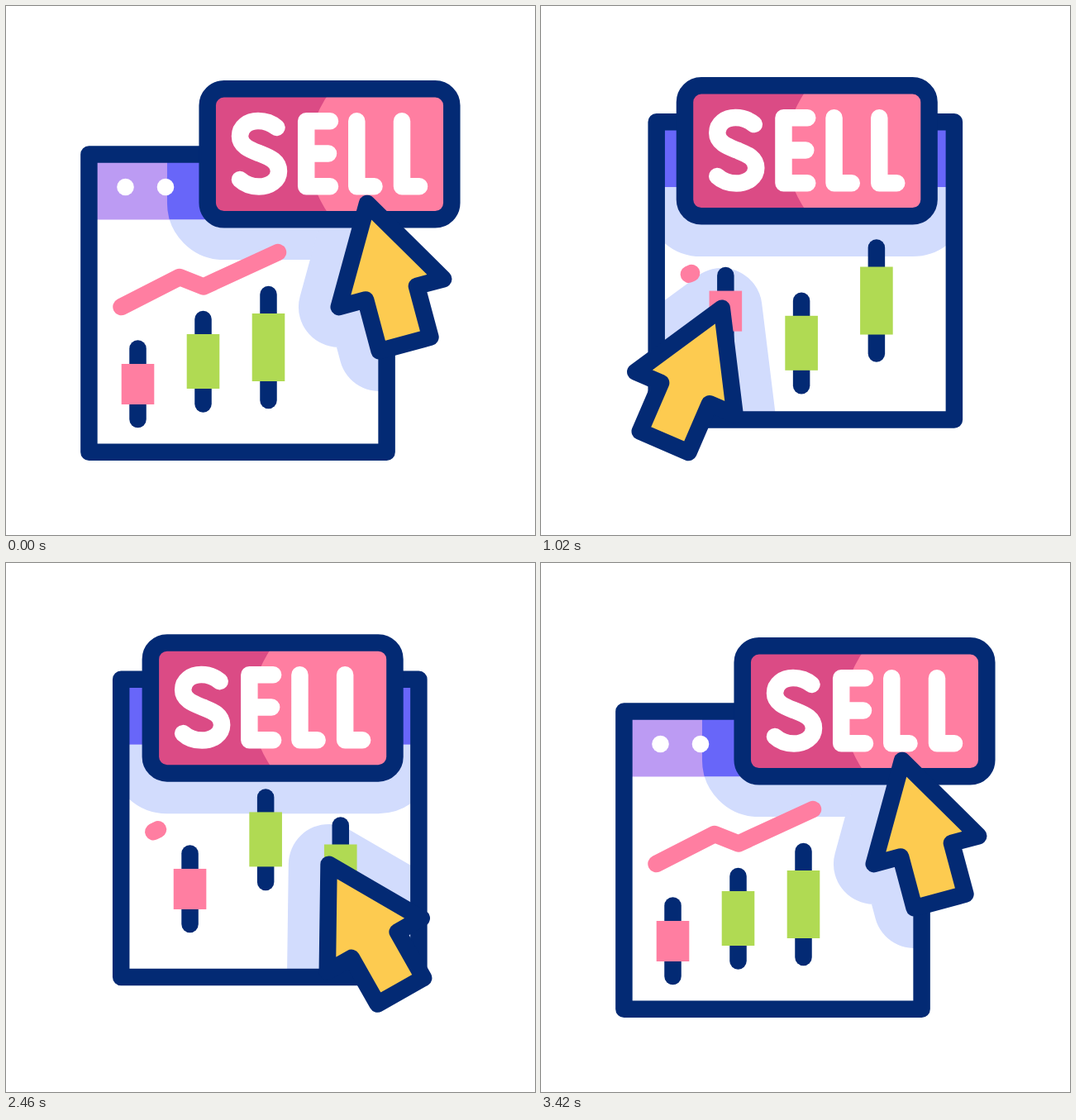
Write an HTML page that moves like this. It is 640 px wide and 640 px high and loops after 3600 ms.

```html
<!DOCTYPE html>
<html lang="en">
<head>
<meta charset="utf-8">
<title>Sell</title>
<style>
  html, body { margin: 0; height: 100%; overflow: hidden; background: #fff; }
  svg { display: block; width: 100vw; height: 100vh; }
  .ink { stroke: #032a74; }
  .ink, .pen { fill: none; stroke-width: 20.5; stroke-linecap: round; stroke-linejoin: round; }
  .halo { stroke-width: 97.5; stroke-linejoin: round; }
</style>
</head>
<body>
<svg viewBox="0 0 640 640">
  <defs>
    <clipPath id="head"><rect class="win" x="110" y="189" width="341" height="69.5"/></clipPath>
    <clipPath id="body"><rect class="win" x="110" y="258.5" width="341" height="272"/></clipPath>
    <rect id="plate" x="243.7" y="100.3" width="295.6" height="158" rx="20"/>
    <path id="arrow" d="M0 0L65.5 112H32V176H-32V112H-65.5Z"/>
    <g id="shadow">
      <use class="button halo" href="#plate"/>
      <use class="cursor halo" href="#arrow"/>
    </g>
  </defs>

  <rect class="win" x="110" y="189" width="341" height="69.5" fill="#bc9bf3"/>
  <g clip-path="url(#head)"><use href="#shadow" fill="#6866f9" stroke="#6866f9"/></g>
  <g clip-path="url(#body)"><use href="#shadow" fill="#d2dcfd" stroke="#d2dcfd"/></g>

  <g class="win">
    <g fill="#fff"><circle cx="144.5" cy="219" r="10.3"/><circle cx="193" cy="219" r="10.3"/></g>
    <rect class="ink" x="100.4" y="179.5" width="360.2" height="360.2"/>
    <path id="trend" class="pen" stroke="#ff7ea1" d="M139.5 364L210 328L239 339.5L329 298"/>
  </g>

  <g class="candle">
    <path class="ink" d="M159.5 414.5V500"/><rect x="139.7" y="433" width="39.6" height="49" fill="#ff7ea1"/>
  </g>
  <g class="candle">
    <path class="ink" d="M238.5 379V481.5"/><rect x="218.7" y="397" width="39.6" height="66" fill="#b0da53"/>
  </g>
  <g class="candle">
    <path class="ink" d="M317.5 349V477"/><rect x="297.7" y="372" width="39.6" height="82" fill="#b0da53"/>
  </g>

  <g class="button">
    <use href="#plate" fill="#ff7ea1"/>
    <path d="M250 105H391Q341 179 391 253H250Z" fill="#db4b85"/>
    <use class="ink" href="#plate"/>
    <path class="pen" stroke="#fff" d="M327.5 147C321 141.5 313 139 305 139C293 139 283 146 283 157.5C283 170 297 174.5 307 178.5
      C318 183 330 187 330 200C330 211 319 218.5 306 218.5C297 218.5 289.5 216 283 210
      M392 139.2H363.2V218.2H392M363.2 178.5H390M424.3 139.2V218.2H445.5M479 139.2V218.2H500"/>
  </g>
  <g class="cursor">
    <use href="#arrow" fill="#fdcb50"/>
    <use class="ink" href="#arrow"/>
  </g>
</svg>
<script>
const LOOP = 3600, END = 3420, LEG = END / 3;
const all = selector => [...document.querySelectorAll(selector)];
const wins = all('.win'), buttons = all('.button'), cursors = all('.cursor'), candles = all('.candle');
const trend = document.getElementById('trend'), trendLength = trend.getTotalLength();

// Smooth monotone curve through [time, value] keys, flat at both ends.
function curve(keys) {
  const slope = i => (keys[i + 1][1] - keys[i][1]) / (keys[i + 1][0] - keys[i][0]);
  const tangents = keys.map((_, i) => {
    if (i === 0 || i === keys.length - 1) return 0;
    const a = slope(i - 1), b = slope(i);
    return 2 * a * b / (a + b);
  });
  return t => {
    const last = keys.length - 1;
    if (t <= keys[0][0]) return keys[0][1];
    if (t >= keys[last][0]) return keys[last][1];
    const i = keys.findIndex(key => key[0] > t) - 1;
    const [t0, a] = keys[i], [t1, b] = keys[i + 1];
    const d = t1 - t0, u = (t - t0) / d, s = u * u * (3 - 2 * u);
    return a + (b - a) * s + d * u * (1 - u) * (tangents[i] * (1 - u) - tangents[i + 1] * u);
  };
}

const open = curve([[0, 0], [180, .015], [520, .7], [720, .86], [960, .97], [1020, .982], [1150, 1]]);
const sweep = curve([[LEG, 0], [1560, .455], [2160, .975], [2 * LEG, 1]]);
const settle = curve([[LEG, 1], [1560, .275], [2030, 0]]);

function track(d) {
  const path = document.createElementNS('http://www.w3.org/2000/svg', 'path');
  path.setAttribute('d', d);
  const length = path.getTotalLength();
  return share => path.getPointAtLength(share * length);
}

// Each leg: path of the cursor tip, then its start and end angle.
const legs = [
  [track('M437 239Q335 384 214 365'), -15, 24],
  [track('M214 365Q300 389 386 365'), 24, -30],
  [track('M386 365Q443.5 363 437 239'), -30, -15]
];

// Final shift of each candle, and how far it bounces on the way.
const shifts = [[65, -65, -25], [78, -98.6, 76], [90, -32.5, -25]];

const place = (items, transform) => items.forEach(item => item.setAttribute('transform', transform));
const move = (x, y) => `translate(${x} ${y})`;

function draw(now) {
  const t = Math.min(now % LOOP, END);
  const w = open(Math.min(t, END - t));
  const bounce = t < LEG ? w : settle(t);

  place(wins, move(40 * w, -40 * w));
  place(buttons, move(-71 * w, -4 * w));
  candles.forEach((candle, i) => {
    const [x, y, kick] = shifts[i];
    place([candle], move(x * w, y * w + kick * bounce));
  });

  trend.style.strokeDasharray = `${trendLength * (1 - w)} 999`;
  trend.style.visibility = w > .995 ? 'hidden' : 'visible';

  const leg = Math.min(2, Math.floor(t / LEG));
  const share = [w, sweep(t), 1 - w][leg];
  const [tip, from, to] = legs[leg];
  const { x, y } = tip(share);
  place(cursors, `${move(x, y)} rotate(${from + (to - from) * share})`);

  requestAnimationFrame(draw);
}
draw(0);
</script>
</body>
</html>
```
